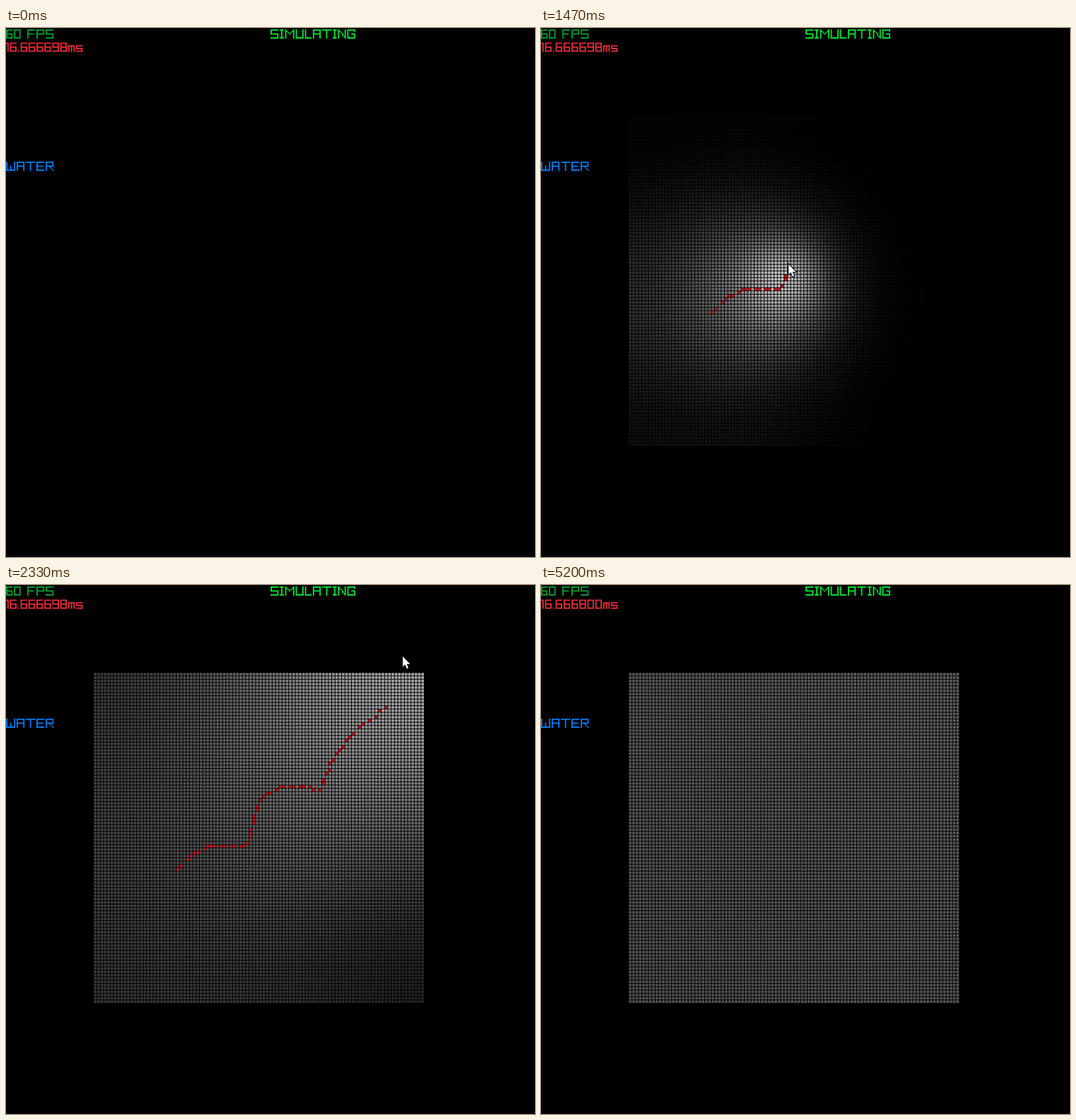
Animation of 748x748 px, one loop 5.27 s. Source, as an HTML page with a canvas:

```html
<!DOCTYPE html>
<html lang="en">
<head>
<meta charset="utf-8">
<title>Water simulation</title>
<style>
  html, body { margin: 0; width: 100%; height: 100%; overflow: hidden; background: #000; }
  canvas { position: absolute; left: 0; top: 0; width: 748px; height: 748px; }
  p { position: absolute; margin: 0; font: 17px/19px "DejaVu Sans Mono", monospace; color: transparent; }
</style>
</head>
<body>
<p data-x="0" data-y="0" data-color="#009e2f">60 FPS</p>
<p id="ms" data-x="0" data-y="20" data-color="#e62937">16.666698ms</p>
<p data-x="400" data-y="0" data-color="#00e430">SIMULATING</p>
<p data-x="0" data-y="200" data-color="#0079f1">WATER</p>
<canvas id="stage" width="748" height="748"></canvas>
<script>
const LOOP = 5270, STEP = 200 / 3, SCALE = 748 / 800;
const N = 100, CELL = 5, ORIGIN = 133;
const SOURCES = 60, START = 1108, TICK = 50 / 3, LAG = 36, TRAIL_END = 2530;
const SPREAD = 800, MEAN = 95, SOFTNESS = 800;
const DRAG_START = 1122, POINTER_START = 130, POINTER_END = 4070;

// Pixel font: width, segments (a-g as on a digit display, h short middle bar,
// i centre stem), then extra strokes from "xy" to "xy"
const GLYPHS = {
  S: '6afgcd', I: '3adi', M: '7bcef 0033 3360', U: '6bcdef', L: '5def', A: '6abcefg',
  T: '7ai', N: '6bcef 0056', G: '6acdef 3353 5051', W: '7bcdef 3336', E: '6adefh',
  R: '6abefg 3456', F: '6aefh', P: '6abefg', ' ': '3', '.': '1d', m: '5abcefi', s: '5acdfg',
  0: '5abcdef', 1: '2abc', 6: '5acdefg', 8: '5abcdefg', 9: '5abcdfg'
};

// Pointer key points: time, x, y
const TRACK = [
  [POINTER_START, 13, 340], [600, 200, 386], [1070, 244, 410], [DRAG_START, 243, 402],
  [1172, 263, 383], [1255, 290, 369], [1372, 337, 369], [1405, 346, 357], [1489, 351, 327],
  [1555, 365, 299], [1639, 393, 285], [1755, 444, 289], [1855, 463, 247], [1955, 491, 210],
  [2055, 537, 173], [2250, 561, 101], [2800, 560, 102], [3270, 552, 354], [3530, 636, 480],
  [3870, 318, 670], [POINTER_END, 380, 775]
];

const makeCanvas = size => Object.assign(document.createElement('canvas'), { width: size, height: size });
const out = document.getElementById('stage').getContext('2d');
const view = makeCanvas(800), ctx = view.getContext('2d');
const field = makeCanvas(N), fieldCtx = field.getContext('2d');
const image = fieldCtx.createImageData(N, N);
const labels = [...document.querySelectorAll('p')];
const ms = document.getElementById('ms');
const arrow = new Path2D('M0 0V14.6L3.3 11.6L5.8 17.2L8 16.2L5.6 10.8H10.4Z');

for (const p of labels) {
  p.style.left = p.dataset.x * SCALE + 'px';
  p.style.top = p.dataset.y * SCALE + 'px';
}
ctx.imageSmoothingEnabled = false;

function pointer(t) {
  const i = TRACK.findIndex(k => k[0] > t);
  const [t0, x0, y0] = TRACK[i - 1], [t1, x1, y1] = TRACK[i];
  const f = (t - t0) / (t1 - t0);
  return [x0 + (x1 - x0) * f, y0 + (y1 - y0) * f];
}

const toCell = v => Math.floor((v / SCALE - ORIGIN) / CELL);
const sources = Array.from({ length: SOURCES }, (_, i) => {
  const t = START + i * TICK;
  const [x, y] = pointer(Math.max(t - LAG, DRAG_START));
  return { t, col: toCell(x), row: toCell(y) };
});

// 1D heat kernel between reflecting walls
function kernel(center, variance) {
  const norm = 1 / Math.sqrt(2 * Math.PI * variance);
  return Float32Array.from({ length: N }, (_, i) => {
    let sum = 0;
    for (let m = -2; m <= 2; m++) {
      const a = i - center + 2 * N * m, b = i + center + 1 + 2 * N * m;
      sum += Math.exp(-a * a / (2 * variance)) + Math.exp(-b * b / (2 * variance));
    }
    return sum * norm;
  });
}

function drawField(t) {
  const live = sources.filter(s => s.t <= t);
  if (!live.length) return;
  const level = new Float32Array(N * N), amount = MEAN * N * N / SOURCES;
  for (const s of live) {
    const variance = 2 * SPREAD * ((t - s.t) / 1000 + 0.012);
    const kx = kernel(s.col, variance), ky = kernel(s.row, variance);
    for (let y = 0; y < N; y++) {
      const w = ky[y] * amount;
      for (let x = 0; x < N; x++) level[y * N + x] += kx[x] * w;
    }
  }
  level.forEach((v, i) => {
    const tone = v / (1 + v / SOFTNESS);
    image.data.set([tone, tone, tone, 255], i * 4);
  });
  fieldCtx.putImageData(image, 0, 0);
  ctx.drawImage(field, ORIGIN, ORIGIN, N * CELL, N * CELL);
  if (t < TRAIL_END) {
    ctx.fillStyle = '#d2141e';
    for (const s of live) ctx.fillRect(ORIGIN + s.col * CELL, ORIGIN + s.row * CELL, CELL, CELL);
  }
  ctx.fillStyle = '#000';
  for (let i = 0; i < N; i++) {
    const line = ORIGIN + i * CELL + CELL - 1;
    ctx.fillRect(line, ORIGIN, 1, N * CELL);
    ctx.fillRect(ORIGIN, line, N * CELL, 1);
  }
}

function segments(right, top) {
  const mid = (top + 6) / 2, centre = right / 2;
  return {
    a: [0, top, right, top], b: [right, top, right, mid], c: [right, mid, right, 6],
    d: [0, 6, right, 6], e: [0, mid, 0, 6], f: [0, top, 0, mid],
    g: [0, mid, right, mid], h: [0, mid, right - 1, mid], i: [centre, top, centre, 6]
  };
}

// Draws one glyph and returns its width
function drawGlyph(ch, left, y) {
  const [body, ...extra] = GLYPHS[ch].split(' ');
  const width = +body[0], seg = segments(width - 1, /[a-z]/.test(ch) ? 2 : 0);
  const strokes = [...body.slice(1)].map(k => seg[k]).concat(extra.map(e => [...e].map(Number)));
  for (const [ax, ay, bx, by] of strokes) {
    const n = Math.max(Math.abs(bx - ax), Math.abs(by - ay), 1);
    for (let k = 0; k <= n; k++) {
      const px = Math.round(ax + (bx - ax) * k / n), py = Math.round(ay + (by - ay) * k / n);
      ctx.fillRect(left + px * 2, y + 2 + py * 2, 2, 2);
    }
  }
  return width;
}

function drawLabel(p) {
  let x = +p.dataset.x;
  ctx.fillStyle = p.dataset.color;
  for (const ch of p.textContent) x += (drawGlyph(ch, x, +p.dataset.y) + 1) * 2;
}

function drawPointer(t) {
  if (t < POINTER_START || t >= POINTER_END) return;
  const [x, y] = pointer(t);
  out.save();
  out.translate(Math.round(x), Math.round(y));
  out.lineWidth = 2;
  out.strokeStyle = '#000';
  out.stroke(arrow);
  out.fillStyle = '#fff';
  out.fill(arrow);
  out.restore();
}

// The frame time jitters now and then
function reading(step) {
  if (step && step % 29 === 0) return '16.666901ms';
  if (step && step % 13 === 0) return '16.666800ms';
  return '16.666698ms';
}

function render(step) {
  const t = Math.round(step * STEP / 10) * 10;
  ms.textContent = reading(step);
  ctx.fillStyle = '#000';
  ctx.fillRect(0, 0, 800, 800);
  drawField(t);
  labels.forEach(drawLabel);
  out.drawImage(view, 0, 0, 748, 748);
  drawPointer(t);
}

let shown = -1;
const begin = performance.now();
function tick() {
  const t = (performance.now() - begin) % LOOP;
  const step = Math.min(78, Math.floor((t + 4) / STEP));
  if (step !== shown) {
    shown = step;
    render(step);
  }
  requestAnimationFrame(tick);
}
tick();
</script>
</body>
</html>
```
